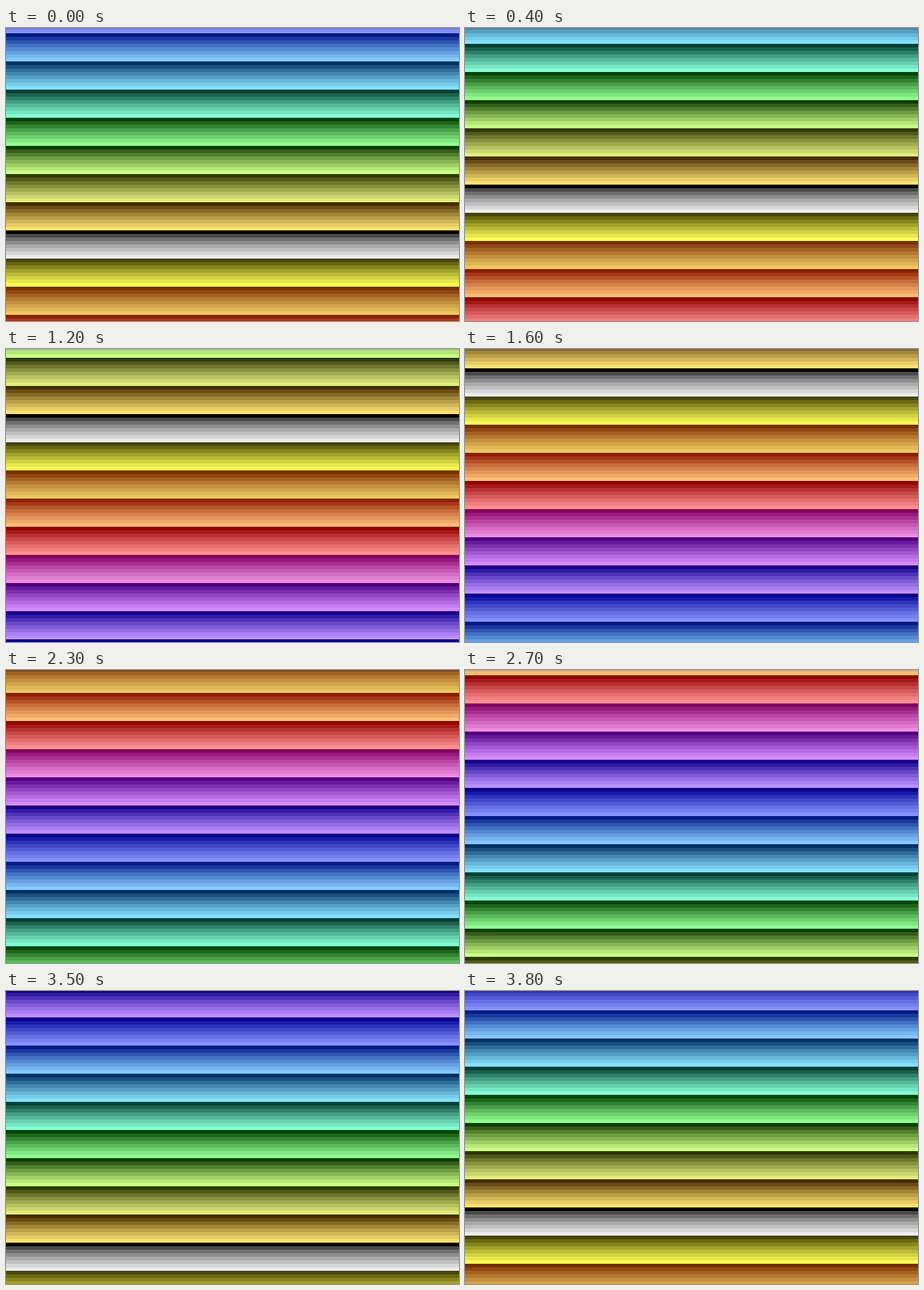
An HTML page with a canvas for the animation above (3.9 s loop, 515 by 333 pixels).

```html
<!DOCTYPE html>
<html lang="en">
<head>
<meta charset="utf-8">
<title>Scrolling colour bars</title>
<style>
html, body { margin: 0; width: 100%; height: 100%; overflow: hidden; background: #000; }
canvas { display: block; }
</style>
</head>
<body>
<canvas id="stage" width="515" height="333"></canvas>
<script>
const ctx = document.getElementById('stage').getContext('2d');

const LINE = 4;      // height of one colour line
const TOP = 230;     // where the grey band starts at time zero
const STEP_MS = 100;
const STEPS = 39;

// Darkest and brightest shade of each hue, from top to bottom
const HUES = [
  ['000000', 'ececec'], ['484800', 'fcfc54'], ['7c2c00', 'ecc860'], ['901c00', 'fcbc74'],
  ['940000', 'fc9090'], ['840064', 'ec8ce0'], ['500084', 'd48cfc'], ['140090', 'bc90fc'],
  ['000094', '8490fc'], ['001c88', '84c8fc'], ['003064', '84e0fc'], ['004030', '84fcd4'],
  ['004400', '90fc90'], ['143c00', 'c8fc84'], ['303800', 'e0ec7c'], ['482c00', 'fce070']
];
const RAMP = [0, .183, .344, .5, .639, .769, .889, 1];
const GREY_RAMP = [0, .314, .47, .602, .72, .814, .907, 1];

const rgb = hex => [0, 2, 4].map(i => parseInt(hex.slice(i, i + 2), 16));

const shades = HUES.flatMap(([dark, bright], hue) => {
  const a = rgb(dark), b = rgb(bright);
  return (hue ? RAMP : GREY_RAMP).map(k =>
    `rgb(${a.map((v, i) => Math.round(v + (b[i] - v) * k)).join(',')})`);
});
const count = shades.length;
const period = count * LINE;

function draw(now) {
  const step = Math.floor(now / STEP_MS) % STEPS;
  const shift = Math.floor(step * count / STEPS) * LINE;
  shades.forEach((colour, i) => {
    const y = (TOP + i * LINE - shift + LINE + 2 * period) % period - LINE;
    ctx.fillStyle = colour;
    ctx.fillRect(0, y, 515, LINE);
  });
}

function tick() {
  draw(performance.now());
  requestAnimationFrame(tick);
}
tick();
</script>
</body>
</html>
```
